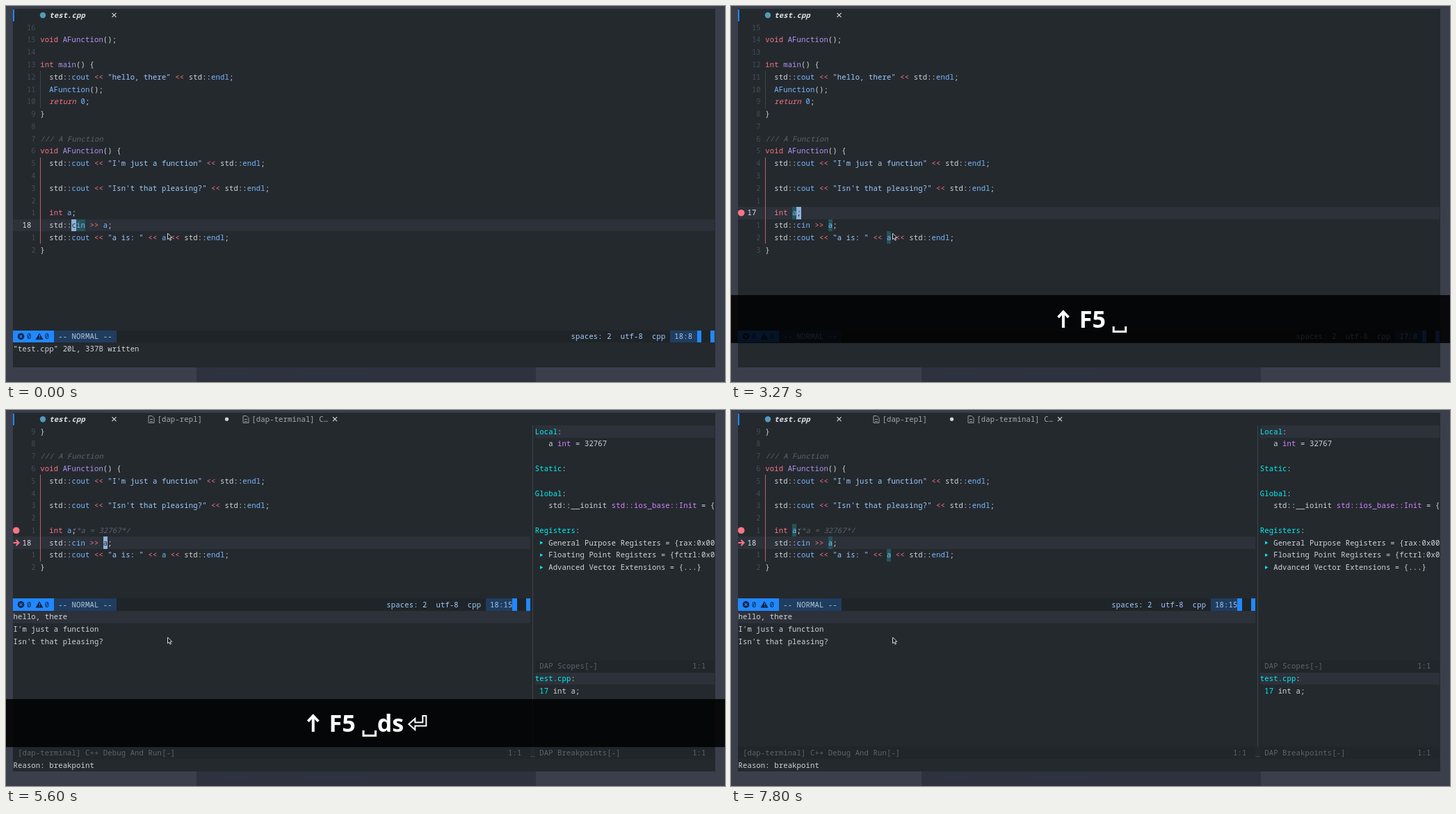
An HTML page with a canvas for the animation above (8 s loop, 1034 by 541 pixels).

```html
<!DOCTYPE html>
<html lang="en">
<head>
<meta charset="utf-8">
<title>Debugging in the editor</title>
<style>
html, body { margin: 0; width: 100%; height: 100%; overflow: hidden; background: #3b3f4c; }
canvas { display: block; width: 1034px; height: 541px; }
</style>
</head>
<body>
<canvas id="stage" width="1034" height="541"></canvas>
<script>
const g = document.getElementById('stage').getContext('2d');
const LOOP = 8000, X0 = 10.4, Y0 = 4.4, CW = 6.468, RH = 17.775, COLS = 156;
const MONO = '10.5px "Noto Sans Mono", "DejaVu Sans Mono", monospace';
const C = {
  bg: '#24292e', line: '#2c313a', bar: '#1f2428', fg: '#d1d5da', dim: '#444d56', note: '#5c646c',
  red: '#f97583', purple: '#b392f0', blue: '#79b8ff', str: '#9ecbff', accent: '#2188ff',
  mode: '#203d5f', ref: '#265459', cursor: '#8fb1d9', cyan: '#00f1f5', type: '#d484ff'
};

const code = `#include <iostream>

void AFunction();

int main() {
  std::cout << "hello, there" << std::endl;
  AFunction();
  return 0;
}

/// A Function
void AFunction() {
  std::cout << "I'm just a function" << std::endl;

  std::cout << "Isn't that pleasing?" << std::endl;

  int a;
  std::cin >> a;
  std::cout << "a is: " << a << std::endl;
}`.split('\n');

const between = (t, a, b) => t >= a && t < b;
const colX = c => X0 + c * CW;
const rowY = r => Y0 + r * RH;

function box(x0, y0, x1, y1, fill) {
  const l = Math.round(x0), u = Math.round(y0);
  g.fillStyle = fill;
  g.fillRect(l, u, Math.round(x1) - l, Math.round(y1) - u);
}
const cells = (row, from, to, fill) => box(colX(from), rowY(row), colX(to), rowY(row + 1), fill);

function text(row, col, s, fill = C.fg, style = '') {
  g.font = style + ' ' + MONO;
  g.letterSpacing = '0px';
  const gap = CW - g.measureText('0').width;
  g.letterSpacing = gap + 'px';
  g.fillStyle = fill;
  g.fillText(s, colX(col) + gap / 2, rowY(row) + 12.5);
  g.letterSpacing = '0px';
}

// Draws [string, colour] pairs one after the other.
function spans(row, col, ...parts) {
  for (const [s, fill] of parts) {
    text(row, col, s, fill);
    col += s.length;
  }
}

function path(points, x = 0, y = 0, closed = false) {
  g.beginPath();
  points.forEach(([px, py]) => g.lineTo(x + px, y + py));
  if (closed) g.closePath();
}
function stroke(color, width) {
  g.strokeStyle = color;
  g.lineWidth = width;
  g.stroke();
}
function dot(x, y, r, fill) {
  g.beginPath();
  g.arc(x, y, r, 0, 7);
  g.fillStyle = fill;
  g.fill();
}
function cross(x, y, r, color, width = 1.2) {
  path([[-r, -r], [r, r]], x, y);
  stroke(color, width);
  path([[r, -r], [-r, r]], x, y);
  stroke(color, width);
}

const TOKEN = /(\/\/\/.*)|("[^"]*")|(\b(?:int|void)\b|<<|>>)|(return)|(AFunction|main)|(cout|cin|endl|\b0\b|\ba\b)|([^\s])/g;
function codeLine(row, src) {
  for (const m of src.matchAll(TOKEN)) {
    const [s, note, str, key, ret, name, val] = m;
    const call = src[0] === ' ' ? C.blue : C.purple;
    const fill = note ? C.note : str ? C.str : key || ret ? C.red : name ? call : val ? C.blue : C.fg;
    text(row, 6 + m.index, s, fill, note || ret ? 'italic' : '');
  }
}

function tabs(debug) {
  box(10, 5, 12, 22, C.accent);
  dot(53, 13.3, 4.2, '#519aba');
  text(0, 8, 'test.cpp', '#e1e4e8', 'italic bold');
  cross(155.5, 13.2, 3, C.fg);
  if (!debug) return;
  for (const [x, col, label] of [[205, 32, '[dap-repl]'], [341, 53, '[dap-terminal] C…']]) {
    path([[0, 0], [5, 0], [8, 3], [8, 10], [0, 10]], x, 8.5, true);
    stroke('#959da5', 1);
    for (const y of [13, 15.5]) box(x + 2, y, x + 6, y + 1, '#959da5');
    text(0, col, label, '#a4abb2');
  }
  dot(317.5, 13.2, 2.6, C.fg);
  cross(473, 13.2, 3, C.fg);
}

function statusLine(row, end, pos) {
  const y = rowY(row) + RH / 2, ink = '#0c2444';
  cells(row, 0, end, C.bar);
  cells(row, 0, 9, C.accent);
  dot(21.5, y, 4.8, ink);
  cross(21.5, y, 1.8, C.accent);
  text(row, 3, '0', ink);
  path([[0, -5], [5.5, 4.5], [-5.5, 4.5]], 48, y, true);
  g.fillStyle = ink;
  g.fill();
  box(47.5, y - 2, 48.5, y + 1.5, C.accent);
  box(47.5, y + 2.4, 48.5, y + 3.4, C.accent);
  text(row, 7, '0', ink);
  cells(row, 9, 23, C.mode);
  text(row, 10, '-- NORMAL --', '#b3c5d8');
  text(row, end - 32, 'spaces: 2', C.str);
  text(row, end - 21, 'utf-8', C.str);
  text(row, end - 14, 'cpp', C.str);
  cells(row, end - 10, end - 4, C.mode);
  text(row, end - 9, pos, C.str);
  cells(row, end - 4, end - 3, C.accent);
  cells(row, end - 1, end, C.accent);
}

// refs: [line, column, length] marks; cursor: column or -1 when blinked off.
function editor({ first, rows, width, current, refs, cursor, mark, arrow, value }) {
  const rowOf = line => line - first + 1;
  const cur = rowOf(current);
  cells(cur, 0, width, C.line);
  for (const [line, col, n] of refs) cells(rowOf(line), 6 + col, 6 + col + n, C.ref);
  if (cursor >= 0) cells(cur, 6 + cursor, 7 + cursor, C.cursor);
  for (let line = first; line <= code.length && rowOf(line) <= rows; line++) {
    const r = rowOf(line), src = code[line - 1], away = Math.abs(line - current);
    if (away) text(r, 3, String(away).padStart(2), C.dim);
    else text(r, 2, String(line), '#e1e4e8');
    if (between(line, 6, 9)) box(49, rowY(r), 50, rowY(r + 1), '#3d454d');
    if (between(line, 13, 20)) box(49, rowY(r), 50, rowY(r + 1), '#b95f6b');
    codeLine(r, src);
  }
  if (cursor >= 0) text(cur, 6 + cursor, code[current - 1][cursor], C.bg);
  if (mark) dot(14.7, rowY(rowOf(17)) + RH / 2, 4.8, C.red);
  if (arrow) {
    const y = rowY(cur) + RH / 2;
    path([[10.5, 0], [18, 0]], 0, y);
    stroke(C.red, 2);
    path([[14.5, -4], [18.5, 0], [14.5, 4]], 0, y);
    stroke(C.red, 2);
  }
  if (value) text(rowOf(17), 13, '/*a = 32767*/', C.note, 'italic');
}

function pane(row, from, to, title) {
  cells(row, from, to, '#21262a');
  text(row, from + 1, title, C.note);
  text(row, to - 5, '1:1', C.note);
}

function debugPanes(stopped) {
  const L = 116;
  cells(16, 0, 115, C.line);
  cells(1, L, COLS, C.line);
  cells(21, L, COLS, C.line);
  box(757, rowY(1), 758, rowY(27), '#3f464d');
  text(27, 115, '_', C.dim);
  if (stopped) {
    ['hello, there', "I'm just a function", "Isn't that pleasing?"].forEach((s, i) => text(16 + i, 0, s));
    [[1, 'Local'], [4, 'Static'], [6, 'Global'], [9, 'Registers']]
      .forEach(([r, s]) => spans(r, L, [s, C.cyan], [':', C.fg]));
    spans(2, L + 3, ['a ', C.fg], ['int', C.type], [' = 32767', C.fg]);
    spans(7, L + 3, ['std::__ioinit ', C.fg], ['std::ios_base::Init', C.type], [' = {', C.fg]);
    ['General Purpose Registers = {rax:0x00', 'Floating Point Registers = {fctrl:0x0', 'Advanced Vector Extensions = {...}']
      .forEach((s, i) => {
        path([[0, -2.5], [4, 0], [0, 2.5]], colX(117) + 1, rowY(10 + i) + RH / 2, true);
        g.fillStyle = C.cyan;
        g.fill();
        text(10 + i, L + 3, s);
      });
    text(28, 0, 'Reason: breakpoint');
  }
  spans(21, L, ['test.cpp', C.cyan], [':', C.fg]);
  spans(22, L + 1, ['17 ', C.cyan], ['int a;', C.fg]);
  pane(20, L, COLS, 'DAP Scopes[-]');
  pane(27, L, COLS, 'DAP Breakpoints[-]');
  pane(27, 0, 115, '[dap-terminal] C++ Debug And Run[-]');
}

// Key display: [from, keys, underline until, underlined tail]
const KEYS = [
  [670, '↑', 870, 1],
  [1000, '↑ F5', 1200, 2],
  [2400, '↑ F5 ␣', 0, 0],
  [3330, '↑ F5 ␣d', 3530, 1],
  [3870, '↑ F5 ␣ds', 4130, 1],
  [5270, '↑ F5 ␣ds⏎', 5470, 1]
];
const DRAWN = {
  '↑': [28, (x, y) => {
    path([[14, 0], [14, -22]], x, y);
    stroke('#fff', 4);
    path([[6.5, -15], [14, -23], [21.5, -15]], x, y);
    stroke('#fff', 3.8);
  }],
  '␣': [22.4, (x, y) => {
    path([[2.5, -2], [2.5, 5.5], [20, 5.5], [20, -2]], x, y);
    stroke('#fff', 3);
  }],
  '⏎': [34, (x, y) => {
    path([[7, -11], [16, -19], [16, -13.5], [27, -13.5], [27, -23], [32, -23], [32, -8.5], [16, -8.5], [16, -3]], x, y, true);
    stroke('#fff', 2);
  }]
};

function keyBar(t) {
  const step = KEYS.filter(k => k[0] <= t).pop();
  if (!step || t >= 7800) return;
  const [, keys, until, tail] = step;
  box(0, 415.5, 1034, 485, 'rgba(0,0,0,.85)');
  g.font = 'bold 34px "Open Sans", "Noto Sans", sans-serif';
  const width = k => DRAWN[k] ? DRAWN[k][0] : g.measureText(k).width;
  const list = [...keys], y = keys === '↑' ? 461 : 463;
  let x = 517 - list.reduce((sum, k) => sum + width(k), 0) / 2;
  list.forEach((k, i) => {
    const w = width(k);
    g.fillStyle = '#fff';
    if (DRAWN[k]) DRAWN[k][1](x, y);
    else g.fillText(k, x, y);
    if (t < until && i >= list.length - tail) box(x, y + 3, x + w, y + 5, '#fff');
    x += w;
  });
}

function pointer() {
  path([[0, 0], [0, 8.8], [2, 7], [3.5, 10.2], [5, 9.5], [3.6, 6.4], [6.2, 6.2]], 232.5, 327, true);
  g.fillStyle = '#16191c';
  g.fill();
  stroke('#d8dadd', 1);
}

const BLINK_OFF = [[530, 670], [1600, 2070], [2870, 3270], [3870, 5130], [5670, 6200], [6730, 7200], [7730, 8000]];
const A_REFS = [[17, 6, 1], [18, 14, 1], [19, 27, 1]];

function desktop() {
  box(0, 0, 1034, 541, '#3b3f4c');
  box(274, 520, 762, 541, '#2d323e');
  for (const [x, w] of [[306, 42], [426, 94]]) box(x, 529, x + w, 531, '#2a3448');
  box(X0 - .4, Y0, 1019.5, 520, C.bg);
}

function message(t) {
  const command = ':!g++ -g test.cpp -o bin/test';
  if (between(t, 4270, 5130)) {
    cells(26, 0, COLS, C.bg);
    text(25, 0, command);
    text(28, 0, 'Press ENTER or type command to continue', C.blue);
    if (!between(t, 4470, 4930)) cells(28, 39, 40, C.cursor);
  } else if (t < 3270) text(27, 0, '"test.cpp" 20L, 337B written');
  else if (between(t, 3870, 4270)) text(27, 0, command);
  if (between(t, 2270, 3270)) text(28, 145, '<20>');
}

function draw(t) {
  const on = !BLINK_OFF.some(([a, b]) => between(t, a, b));
  const debug = t >= 5270, stopped = t >= 5470, moved = t >= 670;
  desktop();
  g.save();
  g.beginPath();
  g.rect(10, 4, 1009.5, 516);
  g.clip();
  tabs(debug);
  if (debug) {
    debugPanes(stopped);
    editor({
      first: 9, rows: 14, width: 115, current: stopped ? 18 : 17,
      refs: t >= 5870 || !stopped ? A_REFS : [],
      cursor: on ? (stopped ? 14 : 7) : -1, mark: true, arrow: stopped, value: stopped
    });
    statusLine(15, 115, stopped ? '18:15' : '17:8');
  } else {
    editor({
      first: 2, rows: 25, width: COLS, current: moved ? 17 : 18,
      refs: moved ? (t >= 1000 ? A_REFS : []) : [[18, 7, 3]],
      cursor: on ? 7 : -1, mark: t >= 870
    });
    statusLine(26, COLS, moved ? '17:8' : '18:8');
    message(t);
  }
  g.restore();
  pointer();
  keyBar(t);
}

const start = performance.now();
function tick() {
  draw((performance.now() - start) % LOOP);
  requestAnimationFrame(tick);
}
tick();
</script>
</body>
</html>
```
